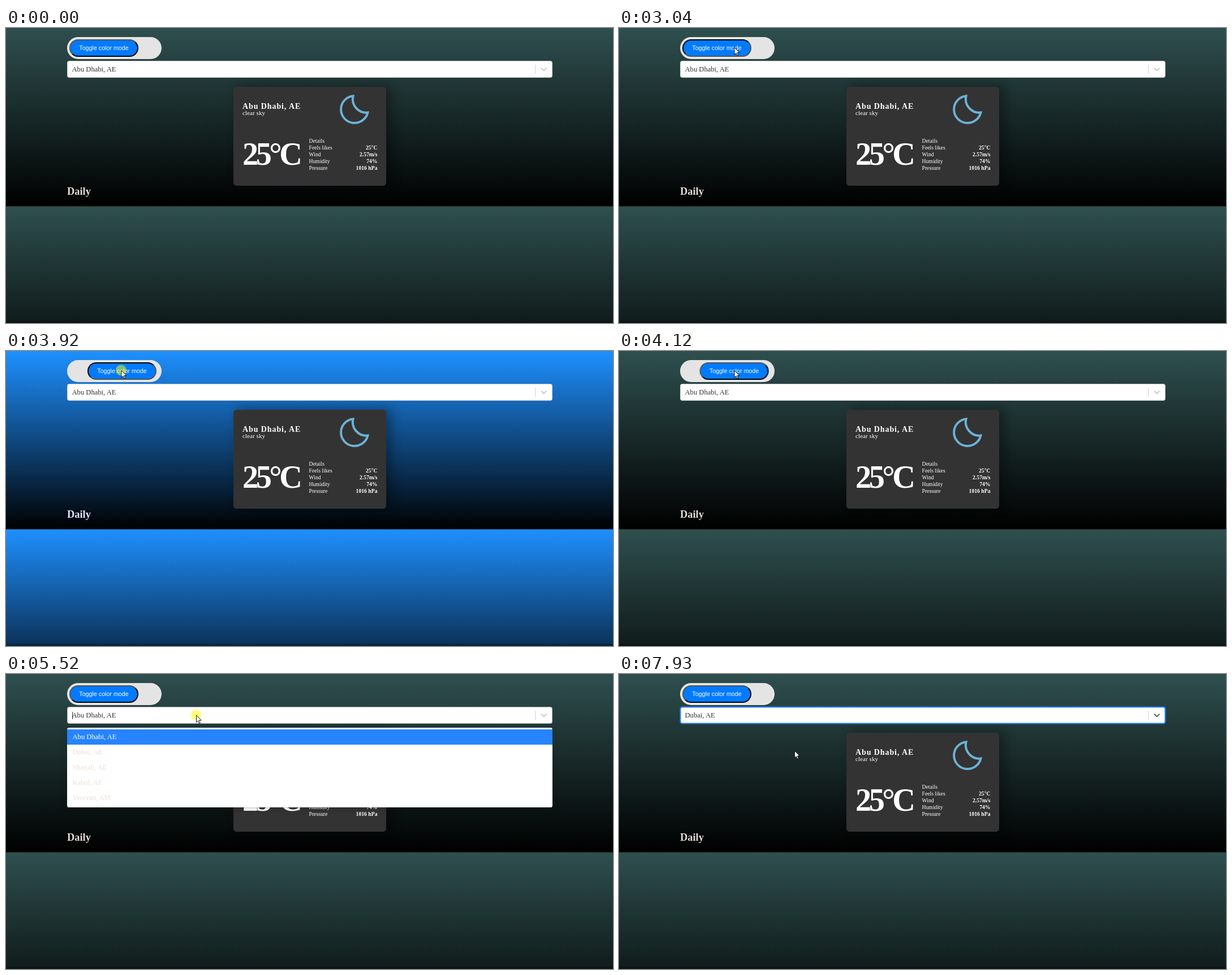
Write an HTML page that moves like this. It is 1073 by 522 pixels and loops after 8 s.

```html
<!DOCTYPE html>
<html lang="en">
<head>
<meta charset="utf-8">
<title>Weather</title>
<style>
  html, body { margin: 0; width: 100%; height: 100%; overflow: hidden; }
  #stage { position: relative; width: 1073px; height: 522px; overflow: hidden; }
  #stage > * { position: absolute; left: 0; top: 0; }
  .bg { width: 100%; height: 100%; background: linear-gradient(#2f4f4f, #000) 0 0 / 100% 315.5px; }
  .light { background-image: linear-gradient(#1e90ff, #000); animation: light 8s infinite step-end; }
  .edge { width: 100%; height: 4px; margin-top: 518px; background: rgba(0, 0, 0, .25); }
  svg text { font-family: "Liberation Serif", "Times New Roman", serif; white-space: pre; }

  #stage > .button {
    left: 112px; top: 20px; width: 122px; height: 31px; box-sizing: border-box;
    border: 2px outset #000; border-radius: 16px; background: #007bff; color: #fff;
    font: 10.7px/27px "Liberation Sans", Arial, sans-serif; text-align: center; white-space: nowrap;
    animation: slide 8s infinite, press 8s infinite step-end;
  }

  .shadow { filter: blur(9px); }
  .card { fill: #fff; }
  .details { font-size: 9.7px; }
  .field { font-size: 12.6px; fill: #333; }
  .daily { font: bold 18.4px "Liberation Serif", serif; fill: #e8ddd6; animation: daily 8s infinite step-end; }

  .control { fill: #fff; stroke: #ccc; animation: control 8s infinite step-end; }
  .ring { fill: none; stroke: #2684ff; stroke-width: 2; animation: ring 8s infinite linear; }
  .chevron { fill: none; stroke: #ccc; stroke-width: 2; stroke-linecap: round; animation: chevron 8s infinite linear; }
  .old { animation: old 8s infinite step-end; }
  .new { animation: new 8s infinite step-end; }
  .caret { animation: caret 8s infinite step-end; }

  .menu { font-size: 12.6px; fill: #efdcd8; animation: menu 8s infinite step-end; }
  .menu .panel { fill: #fff; filter: drop-shadow(0 4px 5px rgba(0, 0, 0, .12)); }
  .menu .hover { animation: hover 8s infinite step-end; }

  .cursor { animation: move 8s infinite linear; }
  .click { fill: #ff0; animation: click 8s infinite step-end; }

  @keyframes light { 0%, 51.5% { opacity: 0 } 38.625% { opacity: 1 } 100% { opacity: 0 } }
  @keyframes daily { 0%, 51.5%, 100% { fill: #e8ddd6 } 38.625% { fill: #e6e6fa } }
  @keyframes slide {
    0%, 57.375%, 100% { transform: none }
    38.625% { transform: none; animation-timing-function: ease }
    44.875% { transform: translateX(32px) }
    51.125% { transform: translateX(32px); animation-timing-function: ease }
  }
  @keyframes press {
    0%, 38.625%, 51.5%, 100% { border-style: outset }
    35.5%, 49% { border-style: inset }
  }
  @keyframes control { 0%, 24.66%, 100% { stroke: #ccc } 23.5%, 60.2% { stroke: #b3b3b3 } }
  @keyframes ring { 0%, 69% { opacity: 0 } 70.25%, 100% { opacity: 1 } }
  @keyframes chevron { 0%, 69% { stroke: #ccc } 70.5%, 100% { stroke: #666 } }
  @keyframes old { 0% { opacity: 1 } 99.125%, 100% { opacity: 0 } }
  @keyframes new { 0% { opacity: 0 } 99.125%, 100% { opacity: 1 } }
  @keyframes caret {
    0%, 75.25%, 89.125%, 99.125%, 100% { opacity: 0 }
    69%, 81.6%, 95.25% { opacity: 1 }
  }
  @keyframes menu { 0%, 99.125%, 100% { opacity: 0 } 69% { opacity: 1 } }
  @keyframes hover { 0% { fill: #fff } 84.44% { fill: #deebff } 96.875%, 100% { fill: #b2d4ff } }
  @keyframes click {
    0%, 38%, 51.5%, 70.5%, 99.125%, 100% { opacity: 0 }
    35.5%, 49%, 68.125%, 96.875% { opacity: .5 }
  }
  @keyframes move {
    0%, 5.49% { transform: translate(1100px, 560px) }
    5.5% { transform: translate(1007px, 512px) }
    14.875% { transform: translate(631px, 316px) }
    25.375% { transform: translate(210px, 39px) }
    27.625% { transform: translate(203.5px, 34px) }
    55.625% { transform: translate(203.5px, 34px); animation-timing-function: cubic-bezier(.33, 0, .67, 1) }
    63.375% { transform: translate(336px, 72.5px) }
    78.375% { transform: translate(336px, 72.5px); animation-timing-function: cubic-bezier(.33, 0, .67, 1) }
    86.625%, 100% { transform: translate(310px, 135.5px) }
  }
</style>
</head>
<body>
<div id="stage">
  <div class="bg"></div>
  <div class="bg light"></div>
  <div class="edge"></div>

  <svg width="1073" height="522">
    <rect x="108" y="16" width="167" height="39" rx="19.5" fill="#e4e4e4"/>

    <rect class="shadow" x="409" y="100.5" width="274" height="178" rx="6" opacity=".3"/>
    <g class="card">
      <rect x="402" y="104" width="270" height="175" rx="5.4" fill="#333"/>
      <text x="418" y="143" font-size="14" font-weight="bold" letter-spacing=".9">Abu Dhabi, AE</text>
      <text x="418" y="154" font-size="11.2">clear sky</text>
      <path d="M613.5 120.2A24 24 0 1 0 639.5 149.5A24 24 0 0 1 613.5 120.2Z"
            fill="none" stroke="#6cb2d6" stroke-width="4"/>
      <text x="418" y="242" font-size="56.3" font-weight="bold" letter-spacing="-4.5">25°C</text>
      <g class="details" id="details"></g>
    </g>
    <text class="daily" x="108" y="295">Daily</text>

    <g class="field">
      <rect class="control" x="108.5" y="58.5" width="857" height="29" rx="3.2"/>
      <rect class="ring" x="108.5" y="58.5" width="857" height="29" rx="3.2"/>
      <text class="old" x="116.5" y="77">Abu Dhabi, AE</text>
      <text class="new" x="116.5" y="77">Dubai, AE</text>
      <rect class="caret" x="117" y="67" width="1" height="13"/>
      <rect x="935.5" y="65" width="1" height="16" fill="#ccc"/>
      <path class="chevron" d="M946.6 71.3L950.8 75.3L955 71.3"/>
    </g>

    <g class="menu" id="menu">
      <rect x="107" y="94" width="860" height="143" rx="4.5" fill="#000" opacity=".1"/>
      <rect class="panel" x="108" y="95" width="858" height="141" rx="3.6"/>
      <rect x="108" y="98" width="858" height="27" fill="#2684ff"/>
      <rect class="hover" x="108" y="125" width="858" height="27"/>
    </g>
  </svg>

  <div class="button">Toggle color mode</div>

  <svg width="1073" height="522">
    <g class="cursor">
      <circle class="click" r="9.5"/>
      <path d="M.5 .5V13L3.4 10.3L5.4 15L7.4 14.1L5.4 9.5H9.3Z" fill="#fff" stroke="#000" stroke-width=".9"/>
    </g>
  </svg>
</div>

<script>
  const addText = (parent, x, y, content, attrs = {}) => {
    const node = document.createElementNS("http://www.w3.org/2000/svg", "text");
    Object.entries({ x, y, ...attrs }).forEach(([key, value]) => node.setAttribute(key, value));
    node.textContent = content;
    parent.append(node);
  };

  const details = document.getElementById("details");
  [["Details"], ["Feels likes", "25°C"], ["Wind", "2.57m/s"], ["Humidity", "74%"], ["Pressure", "1016 hPa"]]
    .forEach(([label, value], i) => {
      const y = 202.5 + 12 * i;
      addText(details, 535.5, y, label);
      if (value) addText(details, 656.5, y, value, { "text-anchor": "end", "font-weight": "bold" });
    });

  const menu = document.getElementById("menu");
  ["Abu Dhabi, AE", "Dubai, AE", "Sharjah, AE", "Kabul, AF", "Yerevan, AM"]
    .forEach((city, i) => addText(menu, 117.5, 115 + 27 * i, city, i ? {} : { fill: "#fff" }));
</script>
</body>
</html>
```
